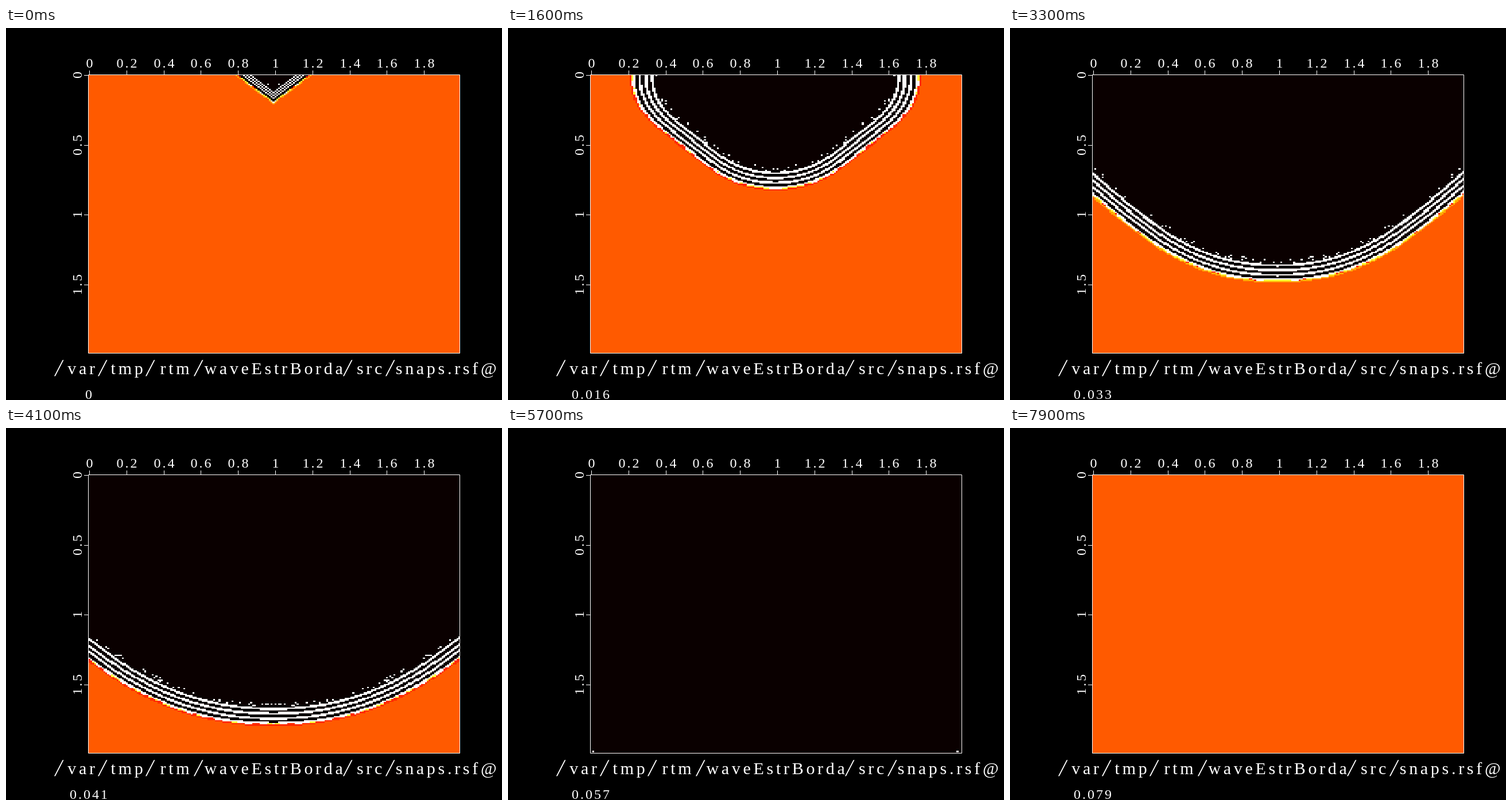
An HTML page with a canvas for the animation above (8000 ms loop, 864 by 648 pixels).

```html
<!DOCTYPE html>
<html lang="en">
<head>
<meta charset="utf-8">
<title>Wave snapshots</title>
<style>
  html, body { margin: 0; width: 100%; height: 100%; overflow: hidden; background: #000; }
  canvas { position: absolute; left: 144px; top: 82px; width: 647px; height: 485px; image-rendering: pixelated; }
  svg { position: absolute; left: 0; top: 0; }
  text { fill: #fff; font: 24px "Liberation Serif", "Times New Roman", serif; letter-spacing: 3px; text-anchor: middle; }
  .word { font-size: 30px; letter-spacing: 4.7px; }
  .slash { font-size: 42px; letter-spacing: 0; text-anchor: start; }
  path { fill: none; stroke: #fff; stroke-width: 1; }
</style>
</head>
<body>
<canvas width="200" height="200"></canvas>
<svg width="864" height="648" viewBox="0 0 864 648">
  <path d="M143.5 81.5H790.5V566.5H143.5Z"/>
  <g id="axes"></g>
  <text id="clock" x="145.5" y="646"></text>
</svg>
<script>
const N = 200, STEP = 100, LOOP = 8000, CLEARED = 76;
const ORANGE = [255, 90, 0], BLACK = [10, 0, 0], WHITE = [255, 255, 255];
const RED = [255, 42, 0], AMBER = [255, 170, 0], YELLOW = [255, 255, 60];

const ctx = document.querySelector('canvas').getContext('2d');
const image = ctx.createImageData(N, N);
const clock = document.getElementById('clock');

function buildAxes() {
  let out = '';
  for (let i = 0; i < 10; i++) {
    const x = Math.round(145 + i * 64.8);
    out += `<path d="M${x + .5} 74V82"/><text x="${x + 2}" y="68.5">${i / 5}</text>`;
  }
  for (let i = 0; i < 4; i++) {
    const y = Math.round(82 + i * 121.6);
    out += `<path d="M136 ${y + .5}H144"/>` +
      `<text transform="translate(132 ${y - 1.5}) rotate(-90)">${i / 2}</text>`;
  }
  // Each word sits in the middle of the gap after its slash.
  const parts = [['var', 84], ['tmp', 160], ['rtm', 243], ['waveEstrBorda', 327], ['src', 587], ['snaps.rsf@', 661]];
  parts.forEach(([word, x], i) => {
    const next = i < 5 ? parts[i + 1][1] : 854;
    out += `<text class="slash" transform="translate(${x} 606) skewX(-10)">/</text>` +
      `<text class="word" x="${(x + 19 + next) / 2 + 2}" y="603">${word}</text>`;
  });
  document.getElementById('axes').innerHTML = out;
}

function hash(a, b, c) {
  const s = Math.sin(a * 12.9898 + b * 78.233 + c * 37.719) * 43758.5453;
  return s - Math.floor(s);
}

// The front starts as a diamond and rounds off as it spreads.
function makeFront(k) {
  const round = 1 - Math.exp(-k / 4);
  const depth = 1.5 * round;
  const radius = 20 + 3.9 * k - depth;
  const diagonal = .113 - .0026 * Math.max(0, k - 27);
  const scale = 1 - .35 * Math.exp(-k / 4);
  return (x, z) => {
    const dz = Math.abs(z - depth), r = Math.hypot(x, dz) || 1e-6;
    const u = x / r, v = dz / r;
    const smooth = 1 - diagonal * (2 * u * v) ** 2.5 - .002 * k * u ** 6;
    const sharp = 1 / (u + v || 1);
    return (radius - r / (sharp + (smooth - sharp) * round)) / scale;
  };
}

// Colour by distance d behind the front.
function shade(d, x, z, k) {
  if (d < 0) return ORANGE;
  if (d < 1) return k % 3 ? RED : AMBER;
  if (d < 1.9) {
    const h = hash(x >> 2, z >> 1, k);
    return h < .35 ? YELLOW : h < .55 ? RED : WHITE;
  }
  if (d < 14) return ((d - 1.2) / 3.5) % 1 < .48 ? WHITE : BLACK;
  return d < 17 && hash(x, z, k) < .1 ? WHITE : BLACK;
}

function drawField(k) {
  const front = makeFront(k);
  for (let z = 0, p = 0; z < N; z++) {
    for (let i = 0; i < N; i++, p += 4) {
      const x = Math.abs(i - 99);
      const color = k >= CLEARED ? ORANGE : shade(front(x, z), x, z, k);
      image.data.set(color, p);
      image.data[p + 3] = 255;
    }
  }
  ctx.putImageData(image, 0, 0);
}

let shown = -1;
function tick() {
  const k = Math.floor(performance.now() % LOOP / STEP);
  if (k !== shown) {
    shown = k;
    drawField(k);
    clock.textContent = k / 1000;
  }
  requestAnimationFrame(tick);
}

buildAxes();
tick();
</script>
</body>
</html>
```
